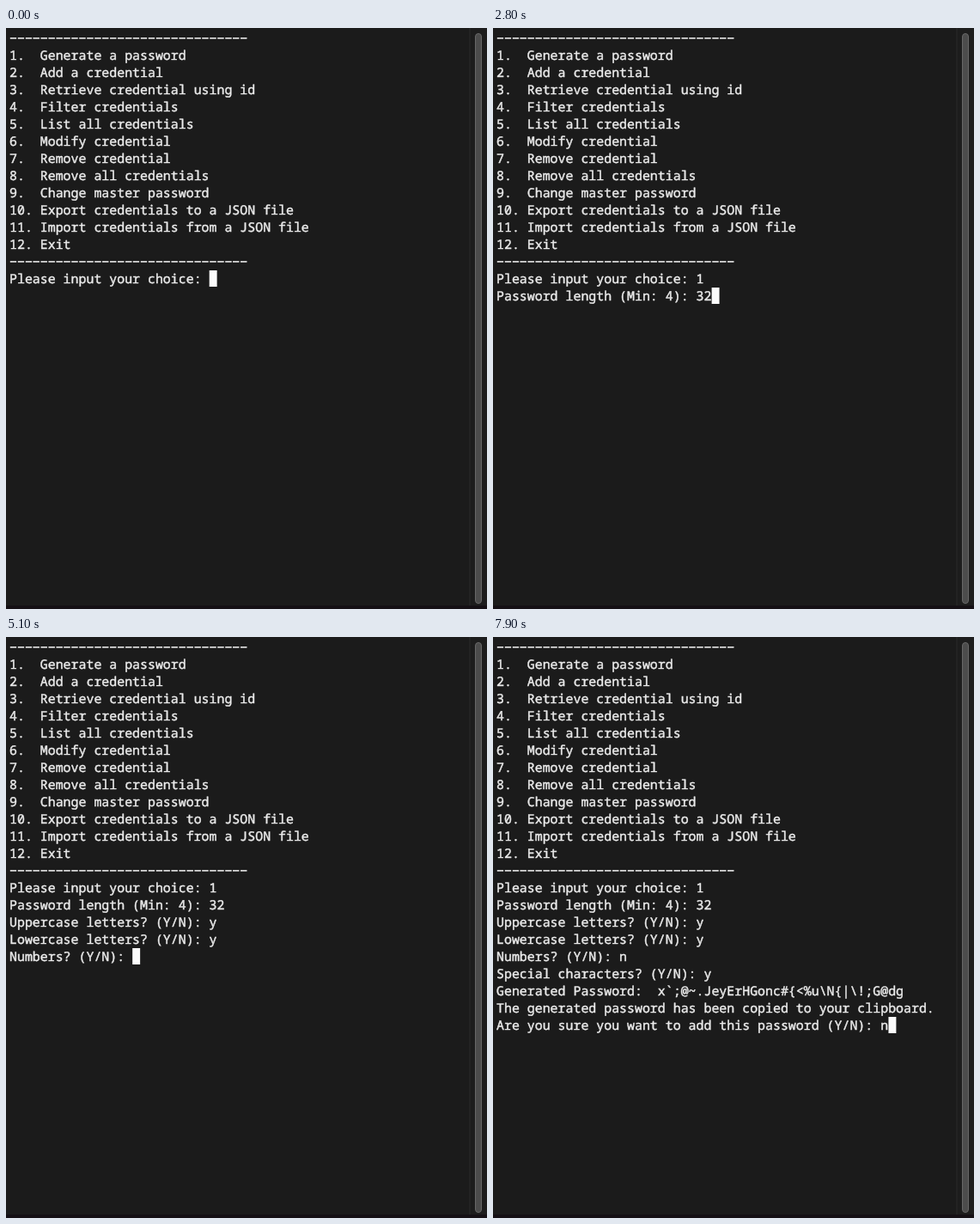
Animation of 560x676 px, one loop 8000 ms. Source, as an HTML page:

```html
<!DOCTYPE html>
<html lang="en">
<head>
<meta charset="utf-8">
<title>Password menu</title>
<style>
  html, body { margin: 0; width: 100%; height: 100%; overflow: hidden; background: #1b1b1b; }
  svg { display: block; width: 560px; height: 676px; }
  text {
    font: 500 14.917px "Noto Sans Mono", "DejaVu Sans Mono", monospace;
    font-variant-ligatures: none;
    text-rendering: geometricPrecision;
    white-space: pre;
    fill: #ebebeb;
    stroke: #ebebeb;
    stroke-width: 0.45px;
  }
</style>
</head>
<body>
<svg viewBox="0 0 560 676">
  <rect width="560" height="676" fill="#1b1b1b"/>
  <rect x="540" width="20" height="672" fill="#1d1d1d"/>
  <rect x="539.5" width="1" height="672" fill="#2a2a2a"/>
  <rect y="672" width="560" height="4" fill="#151015"/>
  <rect x="546.5" y="6.5" width="7" height="663" rx="3.5" fill="#4c4c4c" stroke="#676767"/>
  <g id="screen"></g>
  <rect id="cursor" width="8.95" height="19" fill="#fbfbfb"/>
</svg>
<script>
const LOOP = 8000, CELL = 8.95, ROW = 20, LEFT = 4, BASELINE = 16.5;
const rule = "\u2212".repeat(31);
const items = [
  "Generate a password", "Add a credential", "Retrieve credential using id",
  "Filter credentials", "List all credentials", "Modify credential",
  "Remove credential", "Remove all credentials", "Change master password",
  "Export credentials to a JSON file", "Import credentials from a JSON file", "Exit"
];
const menu = items.map((item, i) => `${i + 1}.`.padEnd(4) + item);

// Terminal output: [time in ms, appended text]
const output = [
  [0, [rule, ...menu, rule, "Please input your choice: "].join("\n")],
  [1400, "1"],
  [2000, "\nPassword length (Min: 4): "],
  [2700, "3"],
  [2800, "2"],
  [3200, "\nUppercase letters? (Y/N): "],
  [3900, "y"],
  [4100, "\nLowercase letters? (Y/N): "],
  [4700, "y"],
  [5100, "\nNumbers? (Y/N): "],
  [5900, "n"],
  [6000, "\nSpecial characters? (Y/N): "],
  [6500, "y"],
  [6700, "\nGenerated Password:  x`;@~.JeyErHGonc#{<%u\\N{|\\!;G@dg" +
         "\nThe generated password has been copied to your clipboard." +
         "\nAre you sure you want to add this password (Y/N): "],
  [7900, "n"]
];

const screen = document.getElementById("screen");
const cursor = document.getElementById("cursor");
const rows = Array.from({ length: 23 }, (_, i) => {
  const row = document.createElementNS("http://www.w3.org/2000/svg", "text");
  row.setAttribute("x", LEFT);
  row.setAttribute("y", BASELINE + i * ROW);
  return screen.appendChild(row);
});

function render(t) {
  const lines = output.filter(([at]) => at <= t).map(([, text]) => text).join("").split("\n");
  rows.forEach((row, i) => {
    const line = lines[i] || "";
    if (row.textContent !== line) row.textContent = line;
  });
  const last = lines.length - 1;
  cursor.setAttribute("x", LEFT + lines[last].length * CELL);
  cursor.setAttribute("y", last * ROW + 2);
}

const start = performance.now();
function tick() {
  render((performance.now() - start) % LOOP);
  requestAnimationFrame(tick);
}
tick();
</script>
</body>
</html>
```
